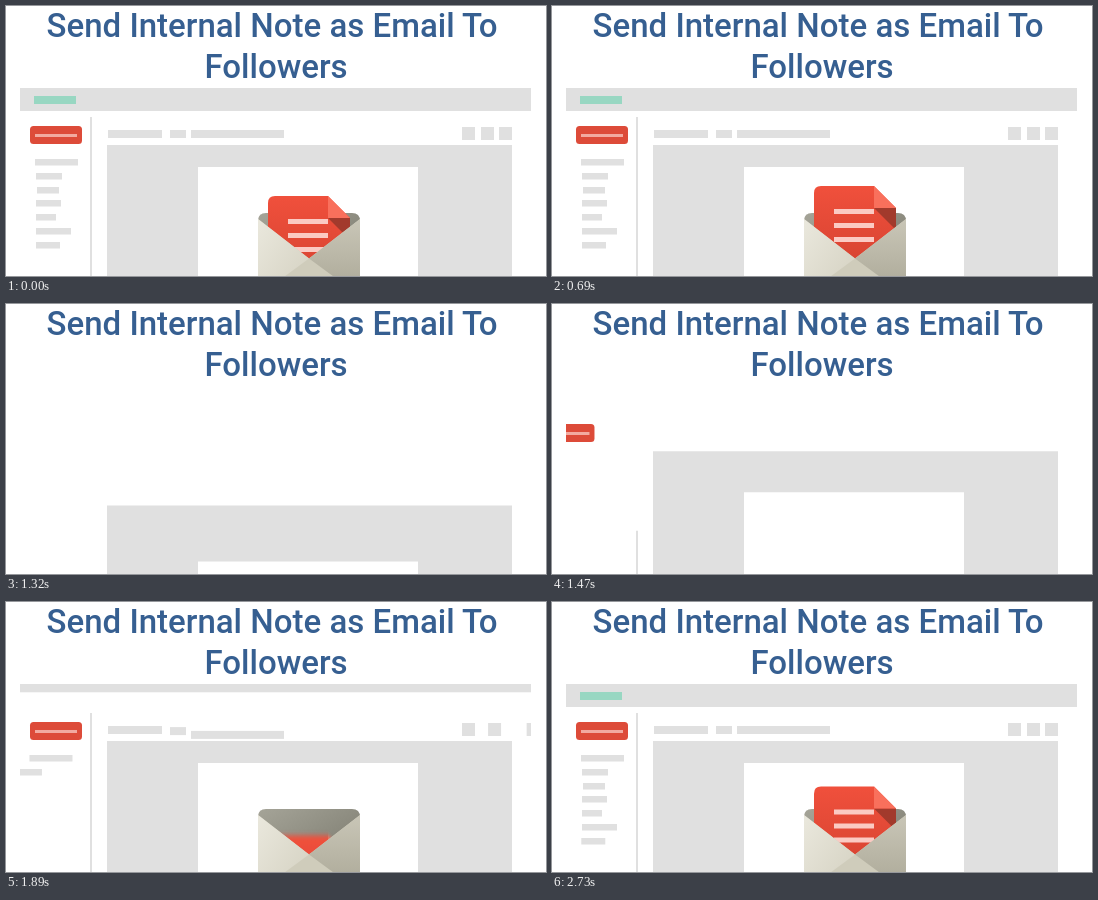
Recreate the animation shown at these times as an HTML page. Size 540x270 px, loop 2790 ms.

```html
<!DOCTYPE html>
<html lang="en">
<head>
<meta charset="utf-8">
<title>Send Internal Note</title>
<style>
html, body { margin: 0; width: 100%; height: 100%; overflow: hidden; background: #fff; }
svg { display: block; width: 540px; height: 270px; }
text { font: 500 33px Roboto, sans-serif; fill: #365f91; text-anchor: middle; }
</style>
</head>
<body>
<svg viewBox="0 0 540 270">
  <defs>
    <clipPath id="screen"><path d="M14 82H525V270H14Z"/></clipPath>
    <clipPath id="toolbar"><path d="M101 111H506V139H101Z"/></clipPath>
    <filter id="blur"><feGaussianBlur id="speed" stdDeviation="0"/></filter>
    <linearGradient id="back" x2="1" y2="1"><stop stop-color="#a5a498"/><stop offset="1" stop-color="#77766a"/></linearGradient>
    <linearGradient id="left" x2="1" y2="1"><stop stop-color="#eae8dd"/><stop offset="1" stop-color="#d3d0c0"/></linearGradient>
    <linearGradient id="right" x2="0" y2="1"><stop stop-color="#c9c6b7"/><stop offset="1" stop-color="#aaa796"/></linearGradient>
    <linearGradient id="paper" x2="0" y2="1"><stop stop-color="#f0503c"/><stop offset="1" stop-color="#d84432"/></linearGradient>
  </defs>
  <text x="266" y="31">Send Internal Note as Email To</text>
  <text x="270" y="72">Followers</text>
  <g id="app" clip-path="url(#screen)" fill="#e0e0e0">
    <g id="bars" clip-path="url(#toolbar)"></g>
    <path id="panel" d="M101 139H506V270H101Z"/>
    <path id="page" d="M192 161H412V270H192Z" fill="#fff"/>
    <g id="envelope">
      <path d="M252 270V215Q252 207 260 207H346Q354 207 354 215V270Z" fill="url(#back)"/>
      <g id="letter" filter="url(#blur)">
        <path d="M262 187Q262 180 269 180H322L344 202V256H262Z" fill="url(#paper)"/>
        <path d="M322 202H344V224Z" fill="#a23a2c"/>
        <path d="M322 180L344 202H322Z" fill="#f9705c"/>
        <path d="M282 203H322V208H282ZM282 217H322V222H282ZM282 231H322V236H282Z" fill="#fbcac3"/>
      </g>
      <path d="M252 213L303 252.5L354 213V282H252Z" fill="#cfccbb"/>
      <path d="M252 213L303 252.5L252 290Z" fill="url(#left)"/>
      <path d="M354 213L303 252.5L354 290Z" fill="url(#right)"/>
    </g>
    <path id="divider" d="M84 111H86V270H84Z"/>
    <g id="button">
      <rect x="24" y="120" width="52" height="18" rx="3.5" fill="#dd4b39"/>
      <path d="M29 128H71V131H29Z" fill="#f2aaa0"/>
    </g>
  </g>
</svg>
<script>
const LOOP = 2790, STEP = 30, CUT = 1140, SLIDE = 340;
const get = id => document.getElementById(id);
const easeOut = p => 1 - (1 - Math.min(1, Math.max(0, p))) ** 2;
const movers = [];

// Slides an element into place from the offset (dx, dy).
const slide = (el, start, dx, dy) => movers.push({ el, start, dx, dy });

function rect(parent, x, y, width, height, fill) {
  const el = document.createElementNS("http://www.w3.org/2000/svg", "rect");
  const attrs = { x, y, width, height };
  if (fill) attrs.fill = fill;
  for (const name in attrs) el.setAttribute(name, attrs[name]);
  return get(parent).appendChild(el);
}

slide(get("panel"), 1215, 0, 131);
slide(get("page"), 1300, 0, 109);
slide(get("button"), 1380, -62, 0);
slide(get("divider"), 1420, 0, 159);
slide(get("envelope"), 1520, 0, 64);

[[102, 54], [164, 16], [185, 93]].forEach(([x, w], i) =>
  slide(rect("bars", x, 124, w, 8), 1540 + i * 102, 0, 15));
[456, 475, 493].forEach((x, i) =>
  slide(rect("app", x, 121, 13, 13), 1490 + i * 188, 525 - x, 0));
[[29, 43], [30, 26], [31, 22], [30, 25], [30, 20], [30, 35], [30, 24]].forEach(([x, w], i) =>
  slide(rect("app", x, Math.round(153 + i * 13.8), w, 6.5), 1655 + i * 130, 14 - x - w, 0));
slide(rect("app", 14, 82, 511, 23), 1822, 0, -23);
slide(rect("app", 28, 90, 42, 8, "#98d7c2"), 1960, 0, -16);

// The letter pops up quickly, rests, then sinks back with growing speed.
function letterDepth(t) {
  const u = t < CUT ? (t + 933) % 1217 : t - 1857;
  const sink = Math.max(0, u - 750) / 130;
  return Math.min(72, 72 * (1 - easeOut(u / 240)) + 5 * sink ** 2);
}

function draw(now) {
  const t = Math.floor(now % LOOP / STEP) * STEP;
  for (const { el, start, dx, dy } of movers) {
    const rest = t < CUT ? 0 : 1 - easeOut((t - start) / SLIDE);
    el.setAttribute("transform", `translate(${dx * rest} ${dy * rest})`);
  }
  const depth = letterDepth(t);
  const rise = Math.max(0, depth - letterDepth(t + 15));
  get("letter").setAttribute("transform", `translate(0 ${depth})`);
  get("speed").setAttribute("stdDeviation", `0 ${rise / 3}`);
}

const begin = performance.now();
function tick() {
  draw(performance.now() - begin);
  requestAnimationFrame(tick);
}
tick();
</script>
</body>
</html>
```
